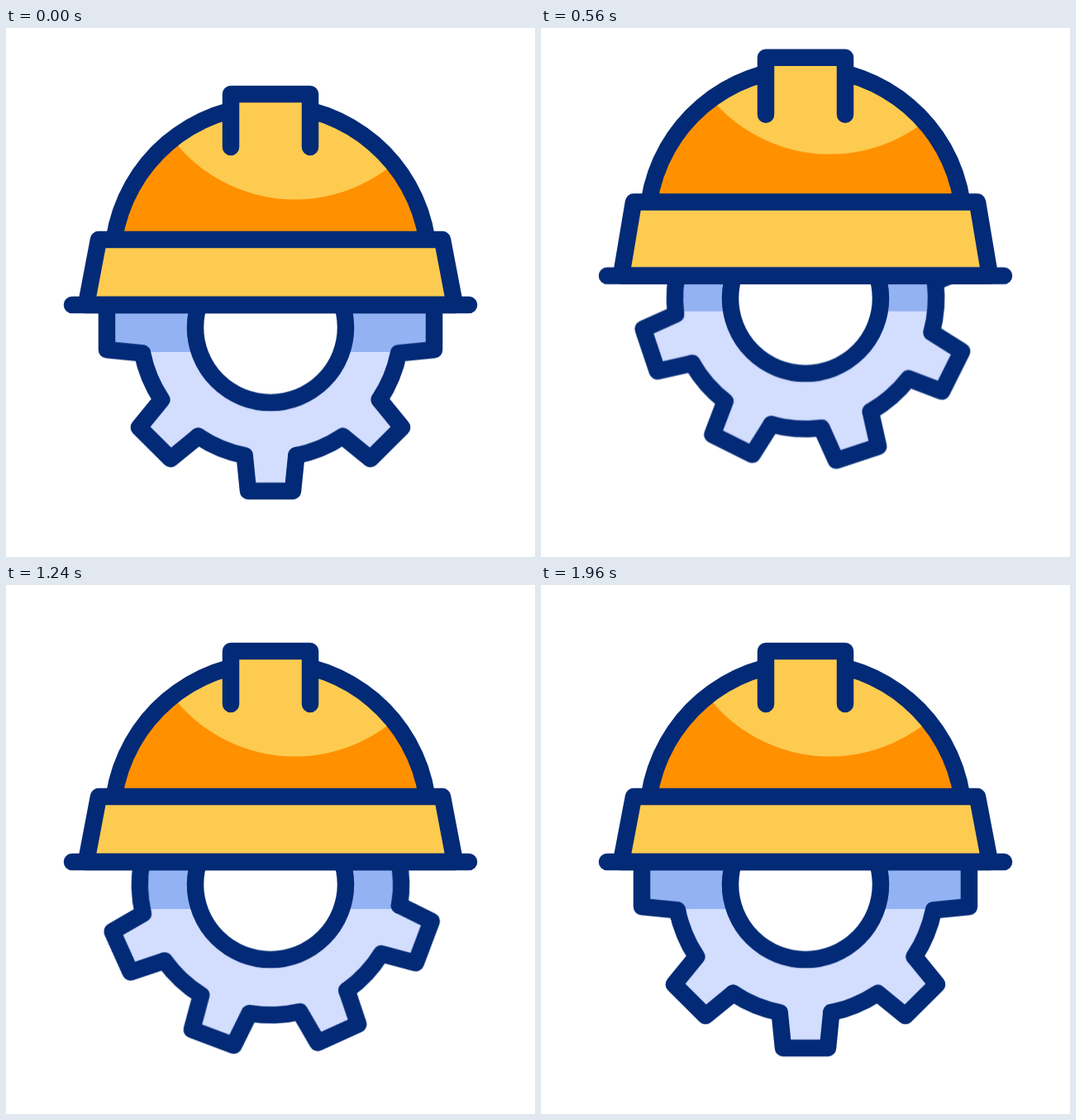
Animation, 640 px wide and 640 px high, one loop 2000 ms. Source, as an HTML page without scripts:

```html
<!DOCTYPE html>
<html lang="en">
<head>
<meta charset="utf-8">
<title>Hard hat and gear</title>
<style>
  html, body { margin: 0; width: 100%; height: 100%; overflow: hidden; background: #fff; }
  svg { display: block; width: 100vw; height: 100vh; }

  .line { stroke: #022a76; stroke-width: 20.5; stroke-linecap: round; stroke-linejoin: round; }
  .bob, .shade, .shine, .dome, .brim, .cap {
    animation: 2s cubic-bezier(.333, 0, .667, 1) infinite;
  }
  .bob { animation-name: bob; }
  .shade { animation-name: shade; }
  .shine { animation-name: shine; }
  .dome { animation-name: dome; }
  .brim { animation-name: brim; }
  .cap { animation-name: cap; }
  .spin { animation: spin 2s infinite; }

  /* rest, squash at 16%, leap at 30%, landed at 48% */
  @keyframes bob {
    0%, 48%, 100% { transform: translateY(0); }
    16% { transform: translateY(28.2px); }
    30% { transform: translateY(-38.8px); }
  }
  @keyframes shade {
    0%, 48%, 100% { transform: translateY(0); }
    16% { transform: translateY(-10.3px); }
    30% { transform: translateY(-14.2px); }
  }
  @keyframes shine {
    0%, 48%, 100% { transform: translateY(0); }
    16% { transform: translateY(52px); }
    30% { transform: translateY(-60.7px); }
  }
  @keyframes dome {
    0%, 48%, 100% { d: path("M130.7 256C145 162.4 225.4 93.5 320 93.5C414.6 93.5 495 162.4 509.3 256"); }
    16% { d: path("M130.7 298.4C145 213.4 225.4 151.5 320 151.5C414.6 151.5 495 213.4 509.3 298.4"); }
    30% { d: path("M130.7 205.4C145 111.4 225.4 43 320 43C414.6 43 495 111.4 509.3 205.4"); }
  }
  @keyframes brim {
    0%, 48%, 100% { d: path("M97 335L112 256.1L528 256.1L543 335Z"); }
    16% { d: path("M97 363.2L112 298.4L528 298.4L543 363.2Z"); }
    30% { d: path("M97 296.2L112 205.6L528 205.6L543 296.2Z"); }
  }
  @keyframes cap {
    0%, 48%, 100% { d: path("M272 144L272 80L368 80L368 144"); }
    16% { d: path("M272 186.8L272 139.5L368 139.5L368 186.8"); }
    30% { d: path("M272 100.2L272 30L368 30L368 100.2"); }
  }
  @keyframes spin {
    0%, 2.5% { transform: rotate(0deg); animation-timing-function: cubic-bezier(.367, 0, .752, 1); }
    98%, 100% { transform: rotate(180deg); }
  }
</style>
</head>
<body>
<svg viewBox="0 0 640 640">
  <defs>
    <path id="tooth" d="M31.3 155L27 198H-27L-31.3 155A158.1 158.1 0 0 1 -87.5 131.7"/>
    <g id="pair">
      <use href="#tooth"/>
      <use href="#tooth" transform="rotate(45)"/>
    </g>
    <g id="teeth">
      <use href="#pair"/>
      <use href="#pair" transform="rotate(90)"/>
      <use href="#pair" transform="rotate(180)"/>
      <use href="#pair" transform="rotate(270)"/>
    </g>
    <g id="disc">
      <circle r="158"/>
      <use href="#teeth"/>
    </g>
    <clipPath id="below"><rect y="335" width="640" height="305"/></clipPath>
    <clipPath id="band"><rect class="shade" y="311" width="640" height="80.3"/></clipPath>
    <clipPath id="shell">
      <path class="dome" d="M130.7 256C145 162.4 225.4 93.5 320 93.5C414.6 93.5 495 162.4 509.3 256"/>
    </clipPath>
  </defs>

  <g class="bob">
    <g clip-path="url(#below)">
      <g transform="translate(320 362.2)">
        <g class="spin"><use href="#disc" fill="#d3ddfe"/></g>
      </g>
      <g clip-path="url(#band)">
        <g transform="translate(320 362.2)">
          <g class="spin"><use href="#disc" fill="#93b2f3"/></g>
        </g>
      </g>
      <g transform="translate(320 362.2)" class="line">
        <g class="spin"><use href="#teeth" fill="none"/></g>
        <circle r="91" fill="#fff"/>
      </g>
    </g>
  </g>

  <path class="dome" fill="#ff9000" d="M130.7 256C145 162.4 225.4 93.5 320 93.5C414.6 93.5 495 162.4 509.3 256"/>
  <g clip-path="url(#shell)">
    <circle class="shine" cx="349.5" cy="21" r="186.5" fill="#fdcb50"/>
  </g>
  <path class="dome line" fill="none" d="M130.7 256C145 162.4 225.4 93.5 320 93.5C414.6 93.5 495 162.4 509.3 256"/>
  <path class="cap line" fill="#fdcb50" d="M272 144L272 80L368 80L368 144"/>
  <path class="brim line" fill="#fdcb50" d="M97 335L112 256.1L528 256.1L543 335Z"/>
  <path class="bob line" d="M80 335H560"/>
</svg>
</body>
</html>
```
